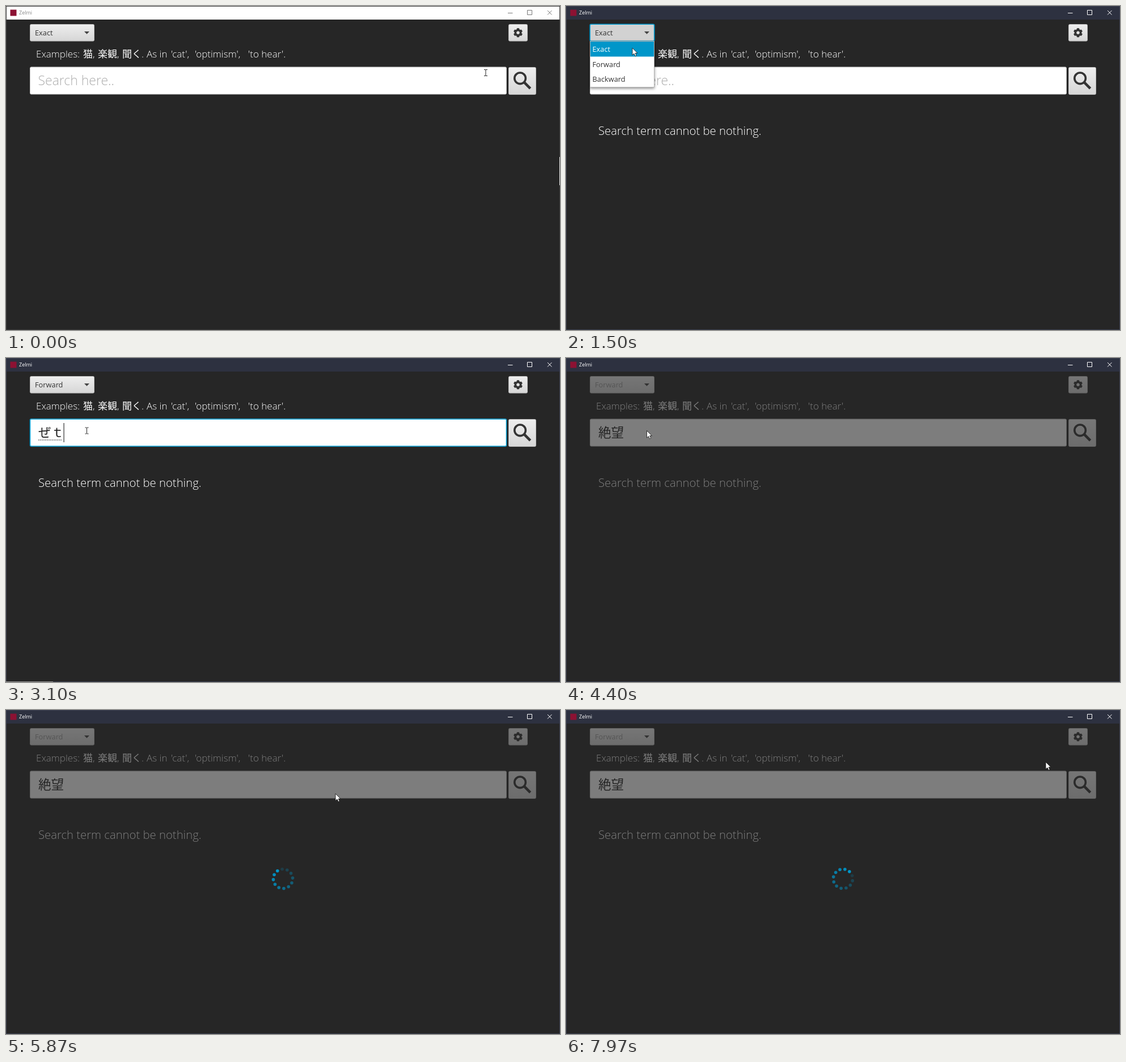
An HTML page for the animation above (8 s loop, 977 px wide and 573 px high).

```html
<!DOCTYPE html>
<html lang="en">
<head>
<meta charset="utf-8">
<title>Dictionary search</title>
<style>
html, body { margin: 0; width: 100%; height: 100%; overflow: hidden; background: #262626; }
svg { display: block; width: 977px; height: 573px; }
text { font-family: "Open Sans", "Noto Sans CJK JP", "Noto Sans CJK", sans-serif; white-space: pre; }
.light { font-weight: 300; fill: #fff; }
.jp { font-family: "Noto Sans CJK JP", "Noto Sans CJK", sans-serif; font-weight: 300; }
.ui { font-size: 12.8px; fill: #333; }
.ring { fill: none; stroke: #039ed3; stroke-width: 1.6; }
.btn { fill: url(#face); stroke: #b9b9b9; }
</style>
</head>
<body>
<svg viewBox="0 0 977 573">
  <defs>
    <linearGradient id="face" x2="0" y2="1">
      <stop stop-color="#eeeeee"/><stop offset="1" stop-color="#d6d6d6"/>
    </linearGradient>
    <filter id="shadow" x="-20%" y="-20%" width="140%" height="150%">
      <feDropShadow dx="0" dy="2" stdDeviation="2.5" flood-opacity=".45"/>
    </filter>
  </defs>
  <rect width="977" height="573" fill="#262626"/>

  <rect id="bar" width="977" height="24"/>
  <rect x="7.5" y="6.5" width="11" height="11" fill="#8c1233"/>
  <text id="title" x="23" y="15.3" font-size="9">Zelmi</text>
  <path id="controls" d="M885 12.5H893.5M919.5 7.5H927.5V15.5H919.5ZM955 8L962.5 15.5M962.5 8L955 15.5" fill="none"/>
  <rect id="frame" x=".5" y=".5" width="976" height="572" fill="none"/>
  <rect id="edge" x="976" y="267" width="1" height="50" fill="#eee"/>
  <rect id="strip" y="572" width="83" height="1" fill="#999"/>

  <g id="content">
    <rect class="btn" id="combo" x="42.5" y="32.5" width="113" height="29.5" rx="2"/>
    <text class="ui" id="choice" x="51" y="52"></text>
    <path d="M138 45H147L142.5 49.7Z" fill="#444"/>
    <rect class="ring" id="comboRing" x="42.3" y="32.3" width="113.4" height="29.8" rx="2"/>

    <rect class="btn" x="886.5" y="32.5" width="33" height="29.5" rx="2"/>
    <g id="gear" transform="translate(903 47.3)" fill="#333">
      <circle r="4.5" fill="none" stroke="#333" stroke-width="3.4"/>
    </g>

    <g id="examples" class="light" font-size="17"></g>

    <rect x="42.5" y="108" width="840" height="48" rx="2" fill="#fff" stroke="#c4c4c4"/>
    <rect class="ring" id="fieldRing" x="42.5" y="108" width="840" height="48" rx="2"/>
    <text id="prompt" class="light" x="56.5" y="140" font-size="23" style="fill:#aeaeae">Search here..</text>
    <text id="typed" class="jp" x="57" y="140" font-size="22.5" fill="#222"></text>
    <path id="under" fill="none" stroke="#333" stroke-dasharray="2 1"/>
    <rect id="caret" y="115" width="1.2" height="34" fill="#333"/>

    <rect class="btn" x="886.5" y="108.5" width="48" height="48" rx="2"/>
    <rect class="ring" id="searchRing" x="886.5" y="108.5" width="48" height="48" rx="2"/>
    <g fill="none" stroke="#333">
      <circle cx="906.6" cy="127.8" r="9.8" stroke-width="3.6"/>
      <path d="M914 135.2L924.6 145.8" stroke-width="4.6"/>
    </g>

    <text id="message" class="light" x="57" y="228" font-size="20.3">Search term cannot be nothing.</text>
  </g>

  <g id="popup">
    <rect x="42.5" y="62.5" width="113" height="81" fill="#fff" stroke="#b5b5b5" filter="url(#shadow)"/>
    <rect id="hover" x="43" width="112" height="26.5" fill="#0096c9"/>
  </g>
  <g id="spinner" fill="#0096c9"></g>
  <path id="arrow" d="M0 0V12.6L3 9.9 5 14.4 7.2 13.4 5.2 9.1H9Z" fill="#fff" stroke="#111" stroke-width=".8"/>
  <path id="beam" d="M-3 -5.5H-.8L0 -5 .8 -5.5H3M0 -5V5M-3 5.5H-.8L0 5 .8 5.5H3" fill="none" stroke="#222"/>
</svg>
<script>
const LOOP = 8000;
const $ = id => document.getElementById(id);
const make = (parent, tag, attrs, text = "") => {
  const el = document.createElementNS("http://www.w3.org/2000/svg", tag);
  for (const k in attrs) el.setAttribute(k, attrs[k]);
  el.textContent = text;
  return parent.appendChild(el);
};
const set = (id, attrs) => { for (const k in attrs) $(id).setAttribute(k, attrs[k]); };
const show = (id, on) => { $(id).style.display = on ? "" : "none"; };

const ACTIVE = 270, MESSAGE = 600, FOCUS_COMBO = 1400, OPEN = 1430, HOVER = 1570,
      PICK = 1800, FOCUS_FIELD = 2130, COMPOSE = 2500, COMMIT = 4200, LOAD = 4400, SPIN = 4520;

// time, x, y, eased
const pointer = [
  [30, 846, 118], [250, 908, 134, 1], [620, 908, 134], [1370, 114, 49, 1], [1430, 115, 53],
  [1500, 117, 74], [1600, 117, 99], [1800, 117, 99], [2100, 142.5, 128.5, 1], [5200, 142.5, 128.5],
  [5400, 190, 137], [5600, 320, 147], [5870, 580, 148], [6030, 743, 137], [6180, 842, 118],
  [6350, 880, 107], [7150, 880, 107], [7690, 846, 92, 1]
];
const typing = [
  [COMPOSE, "ｚ"], [2730, "ぜ"], [3100, "ぜｔ"], [3500, "ぜつ"], [3600, "ぜつｂ"],
  [3900, "ぜつぼ"], [4130, "ぜつぼう"], [4165, "絶望"]
];
const items = ["Exact", "Forward", "Backward"];
const words = [[53, "Examples:"], [136, "猫,"], [162, "楽観,"], [205, "聞く."], [248, "As in"],
  [291, "'cat',"], [333, "'optimism',"], [427, "'to hear'."]];

for (const [x, word] of words) make($("examples"), "text", { x, y: 91 }, word);
for (let i = 0; i < 6; i++)
  make($("gear"), "path", { d: "M-2.9 -5L-1.8 -8H1.8L2.9 -5Z", transform: `rotate(${i * 60})` });
const rows = items.map((s, i) =>
  make($("popup"), "text", { class: "ui", x: 46.5, y: 81 + i * 26.6 }, s));
const dots = Array.from({ length: 12 }, () => make($("spinner"), "circle", { r: 2.8 }));

function pointerAt(t) {
  let a = pointer[0];
  for (const b of pointer) {
    if (t < b[0]) {
      let k = Math.max(0, (t - a[0]) / (b[0] - a[0] || 1));
      if (b[3]) k = k * k * (3 - 2 * k);
      return [a[1] + (b[1] - a[1]) * k, a[2] + (b[2] - a[2]) * k];
    }
    a = b;
  }
  return [a[1], a[2]];
}

// The ring turns slowly backwards while the bright dot steps forwards.
function drawSpinner(t) {
  const turn = 90 - (t - SPIN) * 360 / 3900;
  const head = Math.floor((t - SPIN) / 100) - 4;
  dots.forEach((dot, i) => {
    const a = (turn + i * 30) * Math.PI / 180;
    const lag = (((head - i) % 12) + 12) % 12;
    dot.setAttribute("cx", 488.5 + 17.1 * Math.cos(a));
    dot.setAttribute("cy", 298.5 + 17.1 * Math.sin(a));
    dot.setAttribute("opacity", 1 - lag * 0.8 / 11);
  });
}

function render(t) {
  const active = t >= ACTIVE, open = t >= OPEN && t < PICK, loading = t >= LOAD;
  const focused = t >= FOCUS_FIELD && !loading;
  const composing = t >= COMPOSE && t < COMMIT;

  set("bar", { fill: active ? "#2d3140" : "#fff" });
  set("title", { fill: active ? "#fff" : "#888" });
  set("controls", { stroke: active ? "#fff" : "#777" });
  set("frame", { stroke: active ? "#3b4050" : "#3a3a3a" });
  show("edge", !active);
  show("strip", composing);

  set("content", { opacity: loading ? 0.4 : 1 });
  $("choice").textContent = items[t < PICK ? 0 : 1];
  set("choice", { opacity: loading ? 0.4 : 1 });
  $("combo").style.fill = open ? "#d2d2d2" : "";
  show("searchRing", active && t < FOCUS_COMBO);
  show("comboRing", t >= FOCUS_COMBO && t < FOCUS_FIELD);
  show("fieldRing", focused);
  show("prompt", t < FOCUS_FIELD);
  show("message", t >= MESSAGE);

  const step = typing.filter(s => s[0] <= t).pop();
  const text = step ? step[1] : "";
  const end = 57 + text.length * 22.5;
  $("typed").textContent = text;
  show("under", composing);
  set("under", { d: `M57 145H${end - 3}` });
  show("caret", focused);
  set("caret", { x: end - 0.5 });

  show("popup", open);
  const row = t < HOVER ? 0 : 1;
  set("hover", { y: 63 + row * 26.6 });
  rows.forEach((r, i) => { r.style.fill = i === row ? "#fff" : ""; });

  show("spinner", t >= SPIN);
  drawSpinner(t);

  const [x, y] = pointerAt(t);
  const beam = !open && !loading && x < 883 && y > 108 && y < 156;
  show("beam", beam);
  show("arrow", !beam);
  set(beam ? "beam" : "arrow", { transform: `translate(${x} ${y})` });
}

const start = performance.now();
function tick() {
  render((performance.now() - start) % LOOP);
  requestAnimationFrame(tick);
}
render(0);
requestAnimationFrame(tick);
</script>
</body>
</html>
```
